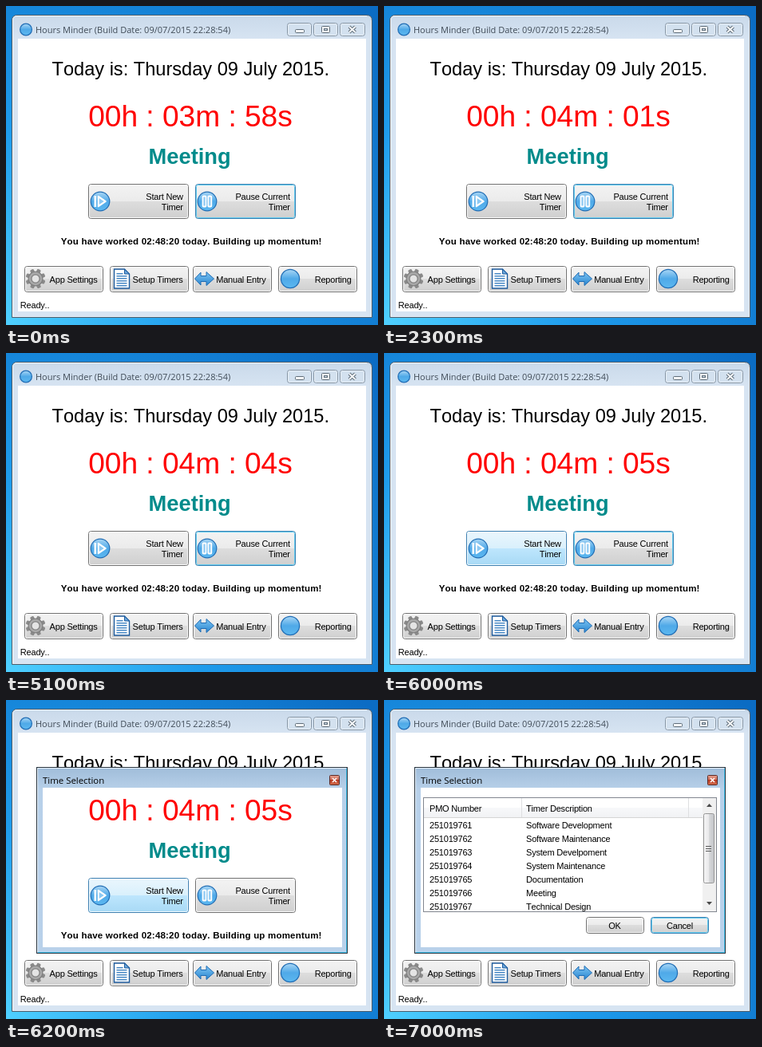
Write an HTML page that moves like this. It is 466 px wide and 400 px high and loops after 8 s.

```html
<!DOCTYPE html>
<html lang="en">
<head>
<meta charset="utf-8">
<title>Hours Minder</title>
<style>
html, body { margin: 0; width: 100%; height: 100%; overflow: hidden; background: #0f83d8; }
svg { display: block; width: 466px; height: 400px; }
text { font-family: "Liberation Sans", Arial, sans-serif; font-size: 11px; letter-spacing: -.2px; font-kerning: none; white-space: pre; }
.cap { font-family: "Open Sans", "Noto Sans", sans-serif; letter-spacing: 0; }
.end { text-anchor: end; }
.mid { text-anchor: middle; }
.big { letter-spacing: 0; }
</style>
</head>
<body>
<svg id="stage" viewBox="0 0 466 400" xmlns="http://www.w3.org/2000/svg"></svg>
<script>
const LOOP = 8000;
const TICKS = [500, 1400, 2300, 3300, 4200, 5100, 6000];
const HOVER = 5500, PRESS = 6100, OPEN = 6200, FILL = 6300, READY = 7000;

// Button looks: four gradient colours, border, inner line
const LOOKS = {
  plain: ['#f3f3f3', '#ebebeb', '#dddddd', '#cfcfcf', '#707070', '#fbfbfb'],
  focus: ['#f3f3f3', '#ebebeb', '#dddddd', '#cfcfcf', '#3c7fb1', '#62cdf0'],
  hot: ['#eaf6fd', '#d9f0fc', '#bee6fd', '#a7d9f5', '#3c7fb1', '#f2fafe'],
  down: ['#e0f1fb', '#c4e5f6', '#98d1ef', '#68b3db', '#2c628b', '#8fbfd9']
};

const grad = (id, stops, dir = 'x2="0" y2="1"') =>
  `<linearGradient id="${id}" ${dir}>` +
  stops.map(([o, c]) => `<stop offset="${o}" stop-color="${c}"/>`).join('') +
  '</linearGradient>';

const rect = (x, y, w, h, fill, more = '') =>
  `<rect x="${x}" y="${y}" width="${w}" height="${h}" fill="${fill}" ${more}/>`;

// One pixel outline drawn inside the given box
const box = (x, y, w, h, fill, line, r = 0) =>
  rect(x + .5, y + .5, w - 1, h - 1, fill, `stroke="${line}" rx="${r}"`);

const label = (x, y, s, cls = '', more = '') =>
  `<text x="${x}" y="${y}" class="${cls}" ${more}>${s}</text>`;

const path = (d, fill, more = '') => `<path d="${d}" fill="${fill}" ${more}/>`;

function face(x, y, w, h, look) {
  const c = LOOKS[look];
  return box(x, y, w, h, `url(#${look})`, c[4], 3) +
    box(x + 1, y + 1, w - 2, h - 2, 'none', c[5], 2);
}

const disc = (x, y, r) =>
  `<circle cx="${x}" cy="${y}" r="${r}" fill="url(#disc)" stroke="#1f6cb4" stroke-width="1.2"/>`;

function gear(x, y) {
  let teeth = '';
  for (let a = 0; a < 360; a += 45)
    teeth += rect(x - 2.5, y - 12.5, 5, 8, '#8a8a8a', `rx="1.5" transform="rotate(${a + 22} ${x} ${y})"`);
  return teeth + `<circle cx="${x}" cy="${y}" r="7" fill="#e4e4e4" stroke="#808080" stroke-width="5"/>` +
    `<circle cx="${x}" cy="${y}" r="7" fill="none" stroke="#a9a9a9" stroke-width="2.4"/>`;
}

function page(x, y) {
  let s = path(`M${x} ${y}h13l6 6v18h-19z`, '#fff', 'stroke="#1c5a9c" stroke-width="1.4"') +
    path(`M${x + 13} ${y}v6h6z`, '#6ea9dc', 'stroke="#1c5a9c"');
  for (let i = 0; i < 6; i++) s += rect(x + 3, y + 5 + i * 3, i < 1 ? 8 : 13, 1.4, '#3f83c2');
  return s;
}

const arrows = path('M236.5 342l7.5-8v4.5h7v-5l9.5 8.5-9.5 8.5v-5h-7v4.5z', 'url(#arrow)',
  'stroke="#1f6cb4" stroke-linejoin="round"');

const playIcon = disc(118, 245, 11.8) +
  path('M115.5 238.5l9.5 6.5-9.5 6.5z', '#fff', 'stroke="#fff" stroke-width="1.6" stroke-linejoin="round"') +
  path('M116.7 241l6 4-6 4z', '#8cc8f2') +
  rect(110.5, 238, 2.6, 14, '#fff');

const pauseIcon = disc(252, 245, 11.8) +
  [246.5, 253.3].map(x => rect(x, 238.5, 4, 13, '#8cc8f2', 'stroke="#fff" stroke-width="1.8" rx=".8"')).join('');

function bigButton(x, look, icon, a) {
  return face(x, 223, 126, 44, look) + icon +
    label(x + 118.8, 243, a, 'end') + label(x + 118.8, 256, 'Timer', 'end');
}

function smallButton(x, icon, s) {
  return face(x, 326, 99, 33, 'plain') + icon + label(x + 91.6, 347, s, 'end');
}

function caption(active) {
  const line = active ? '#4a6078' : '#8595a5';
  const fill = active ? 'url(#knob)' : '#d3e1ef';
  const ink = active ? '#fff' : '#f8fafc';
  const edge = active ? '#4d5a66' : '#5f6d79';
  const knob = (x, w, f) => box(x, 21, w, 17, f, line, 3) +
    box(x + 1, 22, w - 2, 15, 'none', 'rgba(255,255,255,.5)', 2);
  return knob(352, 31, fill) + knob(385, 31, fill) + knob(418, 32, active ? 'url(#red)' : fill) +
    box(362, 29, 12, 5, ink, edge, 1) +
    box(395, 25, 11, 9, ink, edge, 1) + box(398, 28, 5, 3, fill, edge) +
    path('M430 26l7.5 7m0-7l-7.5 7', 'none', `stroke="${edge}" stroke-width="4"`) +
    path('M430 26l7.5 7m0-7l-7.5 7', 'none', `stroke="${ink}" stroke-width="2"`);
}

function frame(active) {
  return path('M7.5 390.5V18q0-6.5 6.5-6.5H452q6.5 0 6.5 6.5V390.5z', active ? 'url(#barOn)' : 'url(#bar)',
    `stroke="${active ? '#1c2a36' : '#4d5c6a'}"`) +
    path('M8.5 389V18q0-5.5 5.5-5.5H452', 'none', `stroke="${active ? '#eaf4fc' : '#f3f8fc'}"`) +
    path('M457.5 18V389.5H9', 'none', `stroke="${active ? '#43c3ee' : '#e3edf7'}"`) +
    rect(15, 41, 436, 342, '#fff') +
    disc(25, 29.5, 7.4) +
    label(37, 34, 'Hours Minder (Build Date: 09/07/2015 22:28:54)', 'cap',
      `fill="${active ? '#101820' : '#414c58'}"`) +
    caption(active);
}

function dialogFrame() {
  return path('M38 84h390v234h-390zM46 110v200h375v-200z', 'url(#dlg)', 'fill-rule="evenodd"') +
    box(38, 84, 390, 234, 'none', '#26323d') +
    path('M39.5 316V85.5H426', 'none', 'stroke="#eaf4fc"') +
    path('M426.5 86v230.5H40', 'none', 'stroke="#43c3ee"') +
    label(46, 105, 'Time Selection', 'cap', 'style="font-size:11.4px"') +
    box(405, 94, 13, 13, 'url(#red)', '#5b2a26', 1) +
    path('M409 98l5 5m0-5l-5 5', 'none', 'stroke="#fff" stroke-width="1.6"');
}

function dialogBody() {
  const names = ['Software Development', 'Software Maintenance', 'System Develpoment',
    'System Maintenance', 'Documentation', 'Meeting', 'Technical Design'];
  const rows = names.map((n, i) =>
    label(57, 161 + 17 * i, 251019761 + i) + label(178, 161 + 17 * i, n)).join('');
  const grip = [183, 186, 189].map(y => rect(403, y, 7, 1, '#5c5c5c')).join('');
  return rect(46, 110, 375, 200, '#fff') +
    box(49, 122, 368, 144, '#fff', '#828790') +
    rect(50, 123, 349, 24, 'url(#head)') + rect(50, 147, 349, 1, '#d5d5d5') +
    rect(172, 123, 1, 24, '#dedfe1') + rect(381, 123, 1, 24, '#dedfe1') +
    label(57, 140, 'PMO Number') + label(178, 140, 'Timer Description') +
    `<g clip-path="url(#list)">${rows}</g>` +
    rect(399, 123, 17, 142, '#f0f0f0') +
    path('M404 134l3.5-4 3.5 4z', '#4a4a4a') + path('M404 253l3.5 4 3.5-4z', '#4a4a4a') +
    box(400, 142, 14, 88, 'url(#thumb)', '#979797', 2) + grip +
    face(253, 272, 73, 21, 'plain') + label(289, 287, 'OK', 'mid') +
    face(334, 272, 73, 21, 'focus') + label(370.5, 287, 'Cancel', 'mid');
}

const defs = '<defs>' +
  Object.entries(LOOKS).map(([k, c]) => grad(k, [[0, c[0]], [.5, c[1]], [.5, c[2]], [1, c[3]]])).join('') +
  '<radialGradient id="desk" gradientUnits="userSpaceOnUse" cx="0" cy="400" r="600">' +
  '<stop offset="0" stop-color="#4fd0ff"/><stop offset=".4" stop-color="#1f9cec"/>' +
  '<stop offset="1" stop-color="#0b6cc4"/></radialGradient>' +
  grad('bar', [[0, '#c9d9ea'], [.08, '#d7e4f2'], [1, '#d7e4f2']]) +
  grad('barOn', [[0, '#99b6d6'], [.08, '#b7cfe8'], [.31, '#d2e3f5'], [.32, '#b9d1ea'], [1, '#b9d1ea']]) +
  grad('knob', [[0, '#d3e4f2'], [.5, '#bdd3e8'], [.5, '#a3c0dc'], [1, '#bcd6ec']]) +
  grad('red', [[0, '#e5a08f'], [.5, '#cf6a55'], [.5, '#b83a24'], [1, '#d5704f']]) +
  grad('dlg', [[0, '#9fbcd9'], [.12, '#b7d0e9'], [1, '#b9d1ea']]) +
  grad('disc', [[0, '#a9d6f5'], [.5, '#4fa9e8'], [1, '#5cb8f0']]) +
  grad('arrow', [[0, '#7cc4f3'], [1, '#2a86d0']]) +
  grad('head', [[0, '#ffffff'], [.5, '#ffffff'], [.5, '#f7f8fa'], [1, '#f1f2f4']]) +
  grad('thumb', [[0, '#f5f5f5'], [.5, '#e9e9eb'], [.5, '#d9dadc'], [1, '#c2c4c8']], 'x2="1" y2="0"') +
  '<clipPath id="list"><rect x="50" y="148" width="349" height="117"/></clipPath>' +
  '</defs>';

const group = (id, s) => `<g id="${id}">${s}</g>`;
const stage = document.getElementById('stage');

stage.innerHTML = defs + rect(0, 0, 466, 400, 'url(#desk)') +
  group('idle', frame(false)) + group('active', frame(true)) +
  label(57.5, 87, 'Today is: Thursday 09 July 2015.', 'big', 'style="font-size:23.6px"') +
  label(103.2, 150.6, '', 'big', 'id="clock" fill="#f00" style="font-size:37.1px"') +
  label(178.6, 198, 'Meeting', 'big', 'fill="#008b8b" font-weight="bold" style="font-size:27.3px"') +
  group('startPlain', bigButton(103, 'plain', playIcon, 'Start New')) +
  group('startHot', bigButton(103, 'hot', playIcon, 'Start New')) +
  group('startDown', bigButton(103, 'down', playIcon, 'Start New')) +
  group('pauseFocus', bigButton(237, 'focus', pauseIcon, 'Pause Current')) +
  group('pausePlain', bigButton(237, 'plain', pauseIcon, 'Pause Current')) +
  label(68.7, 299, 'You have worked 02:48:20 today. Building up momentum!', '',
    'font-weight="bold" style="font-size:11.5px;letter-spacing:.2px"') +
  smallButton(23, gear(37, 342), 'App Settings') +
  smallButton(130, page(135.5, 330), 'Setup Timers') +
  smallButton(234, arrows, 'Manual Entry') +
  smallButton(341, disc(356, 342, 11.6), 'Reporting') +
  label(17.8, 379, '', '', 'id="status"') +
  group('dialog', dialogFrame()) + group('body', dialogBody());

const el = id => document.getElementById(id);
const show = (id, on) => el(id).setAttribute('visibility', on ? 'visible' : 'hidden');
const pad = n => String(n).padStart(2, '0');

function draw(t) {
  const sec = 238 + TICKS.filter(k => t >= k).length;
  const down = t >= PRESS && t < OPEN;
  const hot = t >= HOVER && !down;
  el('clock').textContent = `00h : ${pad(Math.floor(sec / 60))}m : ${pad(sec % 60)}s`;
  el('status').textContent = t >= FILL && t < READY ? 'Starting New Timer..' : 'Ready..';
  show('idle', !down);
  show('active', down);
  show('startPlain', t < HOVER);
  show('startHot', hot);
  show('startDown', down);
  show('pauseFocus', t < PRESS);
  show('pausePlain', t >= PRESS);
  show('dialog', t >= OPEN);
  show('body', t >= FILL);
}

const start = performance.now();
function tick() {
  draw((performance.now() - start) % LOOP);
  requestAnimationFrame(tick);
}
draw(0);
requestAnimationFrame(tick);
</script>
</body>
</html>
```
